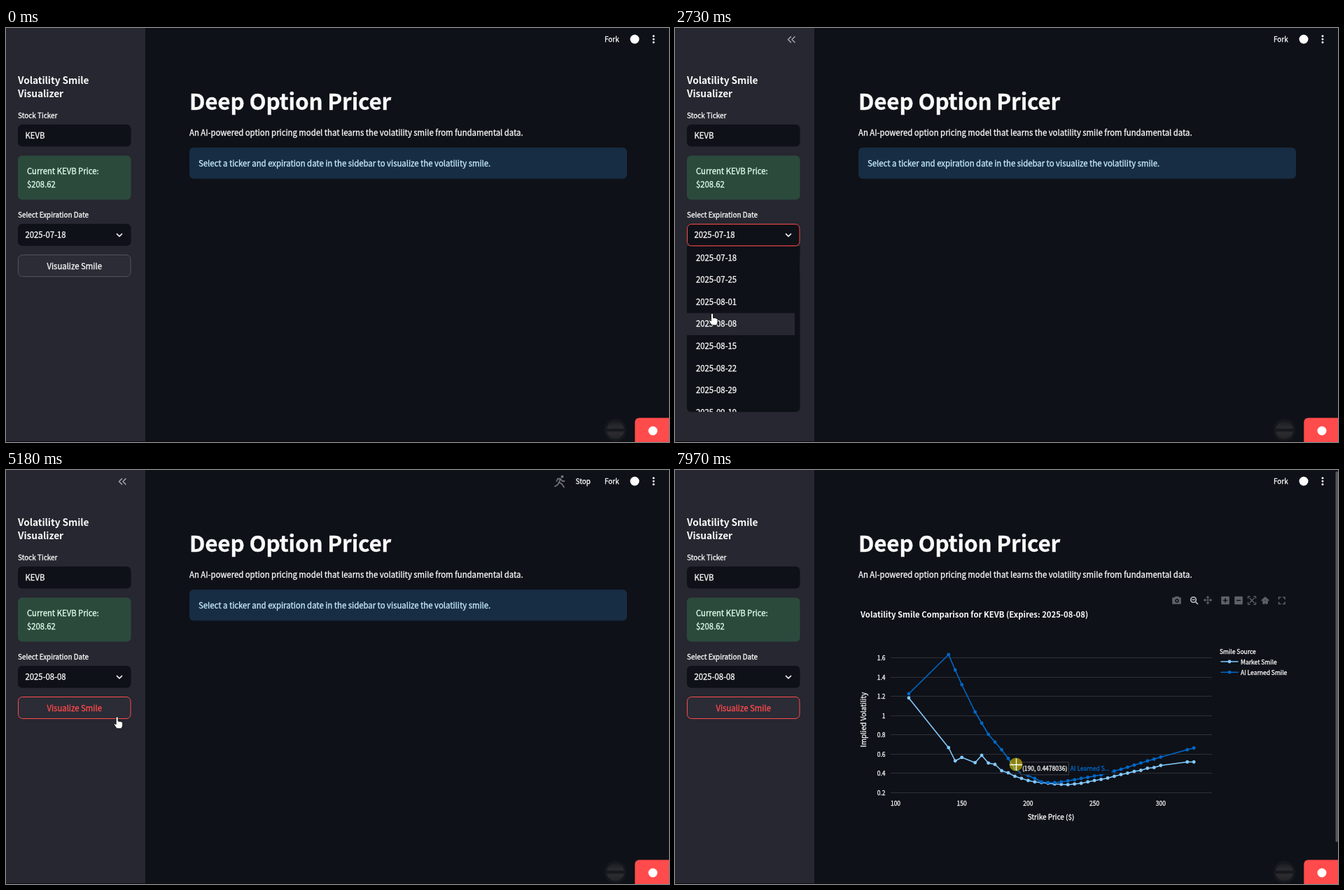
Animation, 947 px wide and 592 px high, one loop 8000 ms. Source, as an HTML page:

```html
<!DOCTYPE html>
<html lang="en">
<head>
<meta charset="utf-8">
<title>Deep Option Pricer</title>
<style>
html, body { margin: 0; width: 100%; height: 100%; overflow: hidden; background: #0e1117; }
svg { display: block; width: 100%; height: 100%; }
text {
  font: 11.34px "Noto Sans CJK JP", "Noto Sans CJK SC", "Noto Sans", sans-serif; white-space: pre;
  color: #fafafa; fill: currentColor; stroke: currentColor; stroke-width: .3px;
}
.small { font-size: 9.93px; }
.tick { font-size: 8.52px; }
.bold { font-weight: 700; stroke-width: 0; }
.h1 { font-size: 31.4px; font-weight: 700; letter-spacing: -.17px; }
.h2 { font-size: 13.75px; font-weight: 700; letter-spacing: -.07px; stroke-width: 0; }
.mid { text-anchor: middle; }
.end { text-anchor: end; }
.line { fill: none; stroke-linecap: round; stroke-linejoin: round; }
</style>
</head>
<body>
<svg viewBox="0 0 947 592">
  <defs>
    <clipPath id="listClip"><path d="M17 312H178.500V543a6 6 0 0 1-6 6H23a6 6 0 0 1-6-6z"/></clipPath>
    <linearGradient id="photo" x2="0" y2="1">
      <stop offset="0" stop-color="#1a1b1f"/><stop offset=".35" stop-color="#2b2c31"/>
      <stop offset=".5" stop-color="#121318"/><stop offset=".65" stop-color="#2c2c31"/>
      <stop offset="1" stop-color="#232326"/>
    </linearGradient>
  </defs>
  <rect width="947" height="592" fill="#0e1117"/>
  <rect width="199" height="592" fill="#262730"/>
  <rect y="591" width="947" height="1" fill="#0c0810"/>

  <!-- sidebar -->
  <path id="collapse" class="line" d="M165.5 12.5l-4 4 4 4M171 12.5l-4 4 4 4" stroke="#a9a9ad" stroke-width="1.5"/>
  <text class="h2" x="17" y="79.5">Volatility Smile</text>
  <text class="h2" x="17" y="98.5">Visualizer</text>
  <text class="small" x="17" y="129">Stock Ticker</text>
  <rect x="17" y="138" width="161.5" height="31.5" rx="6" fill="#0e1117"/>
  <text x="27.5" y="158">KEVB</text>
  <rect x="17" y="182.5" width="161.5" height="63" rx="6" fill="#2b4a3c"/>
  <text x="30" y="208.5" style="color:#dffde9">Current KEVB Price:</text>
  <text x="30" y="227.5" style="color:#dffde9">$208.62</text>
  <text class="small" x="17" y="271">Select Expiration Date</text>
  <rect x="17" y="280" width="161.5" height="31.500" rx="6" fill="#0e1117"/>
  <rect id="focus" x="17.5" y="280.5" width="160.5" height="31" rx="6" fill="none" stroke="#ff4b4b"/>
  <text id="date" x="27.5" y="300"></text>
  <path id="caret" d="M88 288.500V304" stroke="#fafafa"/>
  <path class="line" d="M158.500 294.500l3.500 3.500 3.500-3.500" stroke="#fafafa" stroke-width="1.7"/>
  <rect id="button" x="17.5" y="324.5" width="160.5" height="31" rx="6"/>
  <text id="buttonText" class="mid" x="97.7" y="344.5">Visualize Smile</text>
  <g id="list" clip-path="url(#listClip)">
    <rect x="17" y="312" width="162" height="237" fill="#0e1117"/>
    <rect id="row" x="17" width="154" height="31.6" fill="#262730"/>
  </g>

  <!-- main column -->
  <text class="h1" x="262" y="117">Deep Option Pricer</text>
  <text x="262" y="153.5">An AI-powered option pricing model that learns the volatility smile from fundamental data.</text>
  <g id="info">
    <rect x="262" y="171" width="625" height="44.500" rx="6" fill="#172d43"/>
    <text x="275" y="197.500" style="color:#c7ebff">Select a ticker and expiration date in the sidebar to visualize the volatility smile.</text>
  </g>
  <rect id="skeleton" x="262" y="219" width="625" height="34.500" rx="6" fill="#21242b"/>

  <!-- toolbar -->
  <g id="running">
    <text class="small" x="813.5" y="20">Stop</text>
    <circle cx="794.500" cy="9.500" r="2" fill="#6f7176"/>
    <path id="runner" class="line" stroke="#6f7176" stroke-width="1.8"/>
  </g>
  <text class="small" x="855" y="20">Fork</text>
  <circle cx="898" cy="16" r="6.500" fill="#fff"/>
  <g fill="#fafafa"><circle cx="925" cy="11.600" r="1.500"/><circle cx="925" cy="16" r="1.500"/><circle cx="925" cy="20.400" r="1.500"/></g>

  <g id="chart">
    <rect x="943.500" y="2" width="3.500" height="530" rx="1.700" fill="#55575d"/>
    <text class="bold" x="265" y="211">Volatility Smile Comparison for KEVB (Expires: 2025-08-08)</text>
    <g class="line" stroke="#5f6268" stroke-width="1.600">
      <path d="M711 183h3l1-1.500h4l1 1.500h2v8h-11z" fill="#5f6268"/><circle cx="717" cy="187" r="2" stroke="#0e1117"/>
      <g stroke="#c0c2c6"><circle cx="740.500" cy="185.500" r="3.800"/><path d="M743.500 188.500l3 3M739 185.500h3"/></g>
      <path d="M756 186h10M761 181v10M757.500 184.500l-2 1.500 2 1.500M764.500 184.500l2 1.500-2 1.500M759.500 182.500l1.500-2 1.500 2M759.500 189.500l1.500 2 1.500-2" stroke-width="1.200"/>
      <path d="M781 181.500h10v10h-10zM800 181.500h10v10h-10z" fill="#5f6268"/>
      <path d="M783.500 186.500h5M786 184v5M802.500 186.500h5" stroke="#0e1117"/>
      <path d="M818.500 183.500v-2.500h2.500M827 181h2.500v2.500M829.500 189.500v2.500h-2.500M821 192h-2.500v-2.500M821 183.500l6 6M827 183.500l-6 6" stroke-width="1.300"/>
      <path d="M838 186.500l5-4.500 5 4.500M840 187v4h2v-2.500h2v2.500h2v-4l-3-2.500z" fill="#5f6268"/>
      <path d="M862.500 184.500v-2.500h2.500M868.500 182h2.500v2.500M871 189v2.500h-2.500M865 191.500h-2.500v-2.500"/>
    </g>
    <g id="plot"></g>
    <text class="small mid" x="537" y="500">Strike Price ($)</text>
    <text class="small mid" transform="translate(273 357) rotate(-90)">Implied Volatility</text>
    <text class="tick" x="778" y="263">Smile Source</text>
  </g>
  <g id="tip">
    <rect id="nameBox" height="16" fill="#0e1117"/>
    <path id="tipBox" fill="#0e1117" stroke="#3c3f47"/>
    <text id="tipText" class="tick"></text>
    <text id="tipName" class="tick"></text>
  </g>

  <circle cx="870.500" cy="575" r="16" fill="#15181d"/>
  <circle cx="870.500" cy="575" r="12.500" fill="url(#photo)"/>
  <path d="M898.300 592v-28.500a6 6 0 0 1 6-6H947v34.500z" fill="#ff4b4b"/>
  <circle cx="924" cy="576" r="6.500" fill="#fff"/>

  <g id="pointer">
    <circle id="click" r="9.500" fill="#ffe600" opacity=".52"/>
    <path id="arrow" d="M0 0V12.300l2.800-2.600 2 4.400 2.100-1-2-4.200h3.800z" fill="#fff" stroke="#000" stroke-width=".6"/>
    <path id="beam" class="line" d="M-2.500-5.500Q-.5-5.500 0-4.500Q.5-5.500 2.500-5.500M0-4.500V4.500M-2.500 5.500Q-.5 5.500 0 4.500Q.5 5.500 2.500 5.500" stroke="#e8e8e8" stroke-width="1.100"/>
    <path id="hand" d="M-1.500 0.500a1.500 1.500 0 0 1 3 0V5.500q3.500-.3 6.500 1.500v4.500l-1.500 4.500h-7l-4-6q.5-2 3 0z" fill="#fff" stroke="#000" stroke-width=".8"/>
    <path id="cross" d="M-8.500 .5H9M.5-8.500V9" stroke="#fff" stroke-width="1.300"/>
  </g>
</svg>
<script>
const LOOP = 8000, OPEN = 1920, PICK = 3600, PRESS = 4850, RUN = 5150, WAIT = 5250, DONE = 6420;
const $ = id => document.getElementById(id);
const show = (id, on) => $(id).style.display = on ? '' : 'none';
const set = (id, attrs) => { for (const k in attrs) $(id).setAttribute(k, attrs[k]); };
const add = (id, markup) => $(id).insertAdjacentHTML('beforeend', markup);
const clamp = v => Math.max(0, Math.min(1, v));

// drop-down list
const dates = ['07-18', '07-25', '08-01', '08-08', '08-15', '08-22', '08-29', '09-19'].map(d => '2025-' + d);
const ROW = 31.6, TOP = 312.8;
dates.forEach((d, i) => add('list', `<text x="30" y="${332.5 + ROW * i}">${d}</text>`));

// chart
const X = s => 315 + (s - 100) * 1.894, Y = v => 461 - (v - .2) * 137.86;
const strikes = [110, 140, 145, 150, ...Array.from({ length: 29 }, (_, i) => 160 + 5 * i), 320, 325];
const series = [
  { name: 'Market Smile', color: '#83c9ff', y: [326, 397, 416, 411, 418.5, 408, 419, 421, 430, 433, 438, 441, 444, 446, 447, 448,
    449, 449.5, 450, 449, 448, 446, 444, 442.5, 440.5, 438, 435.5, 433.5, 431, 429.5, 426.5, 425.5, 422.5, 417.5, 417.5] },
  { name: 'AI Learned Smile', color: '#0068c9', y: [320, 264, 286, 307, 346, 362, 378, 389, 400, 412.5, 426.8378, 434, 437, 441, 446, 447,
    447, 446, 444.5, 443, 441, 439.5, 437.5, 436, 433, 430.5, 428, 425, 422, 419, 416, 413.5, 410.5, 400, 397.5] }
];
for (let i = 1; i < 9; i++) {
  const v = i / 5, y = Math.round(Y(v)) + .5;
  add('plot', `<path d="M308 ${y}H767" stroke="#2e3138"/><text class="tick end" x="300.500" y="${y + 3}">${v}</text>`);
}
for (let s = 100; s <= 300; s += 50) add('plot', `<text class="tick mid" x="${X(s)}" y="480">${s}</text>`);
const points = [];
series.forEach(({ name, color, y }, n) => {
  const own = strikes.map((s, i) => ({ s, x: X(s), y: y[i], name, color }));
  const ly = 274 + 15.2 * n;
  points.push(...own);
  add('plot', `<path class="line" d="M${own.map(p => p.x + ' ' + p.y).join('L')}M780 ${ly}h24" stroke="${color}" stroke-width="1.600"/>`
    + [...own, { x: 792, y: ly }].map(p => `<circle cx="${p.x}" cy="${p.y}" r="2.400" fill="${color}"/>`).join('')
    + `<text class="tick" x="808" y="${ly + 3.8}">${name}</text>`);
});

// pointer path: time, x, y
const path = [[260, 800, 592], [1060, 180, 319], [1090, 180, 319], [1200, 148, 297], [2060, 148, 297], [2530, 53, 409],
  [2880, 53, 409], [3130, 105, 421], [4060, 105, 420], [4260, 116, 370], [4340, 116, 370], [4650, 126, 342], [5050, 126, 342],
  [5810, 540, 491], [6860, 540, 491], [6890, 544, 491], [6960, 544, 491], [7300, 472, 406], [7570, 487, 421], [LOOP, 487, 421]];
function pointerAt(t) {
  const i = Math.max(1, path.findIndex(k => k[0] > t));
  const [t0, x0, y0] = path[i - 1], [t1, x1, y1] = path[i];
  const u = clamp((t - t0) / (t1 - t0)), e = u * u * (3 - 2 * u);
  return [x0 + (x1 - x0) * e, y0 + (y1 - y0) * e];
}
const during = (t, a, b) => t >= a && t < b;

function drawTip(x, y, on) {
  const dist = p => Math.hypot(p.x - x, p.y - y);
  const p = points.reduce((a, b) => dist(b) < dist(a) ? b : a);
  on = on && dist(p) < 20;
  show('tip', on);
  if (!on) return;
  const value = .2 + (461 - p.y) / 137.86, left = p.x + 8.5;
  $('tipText').textContent = `(${p.s}, ${+value.toFixed(7)})`;
  $('tipName').textContent = p.name.length > 15 ? p.name.slice(0, 12) + '...' : p.name;
  const right = left + $('tipText').getComputedTextLength() + 4;
  set('tipText', { x: left + 2, y: p.y + 3.5 });
  set('tipName', { x: right + 2.5, y: p.y + 3.5 });
  $('tipName').style.color = p.color;
  set('tipBox', { d: `M${p.x} ${p.y}l8.500-5v-4H${right}v18H${left}v-4z` });
  set('nameBox', { x: right, y: p.y - 8, width: $('tipName').getComputedTextLength() + 5 });
}

function drawButton(t, over) {
  const pressed = during(t, PRESS, 5000), hot = over || t >= PRESS;
  set('button', { fill: pressed ? '#ff4b4b' : '#2b2c36', stroke: hot ? '#ff4b4b' : '#51525b' });
  $('buttonText').style.color = hot && !pressed ? '#ff4b4b' : '#fafafa';
}

function draw(t) {
  const [x, y] = pointerAt(t), seen = t >= 260;
  const inSide = x > 17 && x < 178, open = during(t, OPEN, PICK);
  const onSelect = inSide && y > 280 && y < 312;
  const onList = open && inSide && y >= 312;
  const onButton = !open && inSide && y > 324 && y < 356;
  const onPlot = t >= DONE && x > 308 && x < 767 && y > 240 && y < 461;

  show('collapse', seen && x < 199);
  show('focus', during(t, 1790, 5000));
  set('focus', { opacity: t < PRESS ? 1 : .55 * clamp((5000 - t) / 150) });
  $('date').textContent = dates[t < PICK ? 0 : 3];
  const blink = t - (t < PICK ? 1870 : PICK);
  show('caret', during(t, 1790, PRESS) && Math.floor(blink / 530) % 2 <= 0);
  show('list', open);
  set('list', { opacity: clamp(.5 + (t - OPEN) / 200) });
  set('row', { y: TOP + ROW * (onList ? Math.max(0, Math.floor((y - TOP) / ROW)) : 0) });
  drawButton(t, seen && onButton);

  show('info', t < WAIT);
  show('skeleton', during(t, WAIT, DONE));
  show('running', during(t, RUN, DONE));
  set('runner', { d: Math.floor((t - RUN) / 200) % 2
    ? 'M792 12.500l-2 5M786 15l2-2.500 4 0 2 3 3 0M790 17.500l-1 3.500-4 1M790 17.500l3 2 0 5'
    : 'M792 12.500l-2 5M786.500 16l1.500-3.500 4 0 2 3 3.500 .5M790 17.500l-2 3.500-4 2.500M790 17.500l4 2.500 3 4.500' });
  show('chart', t >= DONE);
  drawTip(x, y, onPlot);

  const kind = onSelect ? 'beam' : onList || onButton ? 'hand' : onPlot ? 'cross' : 'arrow';
  show('pointer', seen);
  set('pointer', { transform: `translate(${x} ${y})` });
  for (const id of ['arrow', 'beam', 'hand', 'cross']) show(id, id === kind);
  show('click', during(t, 1790, 1930) || during(t, 3460, PICK) || during(t, PRESS, 5000) || t >= 7970);
}

const start = performance.now();
function tick() {
  draw((performance.now() - start) % LOOP);
  requestAnimationFrame(tick);
}
tick();
</script>
</body>
</html>
```
